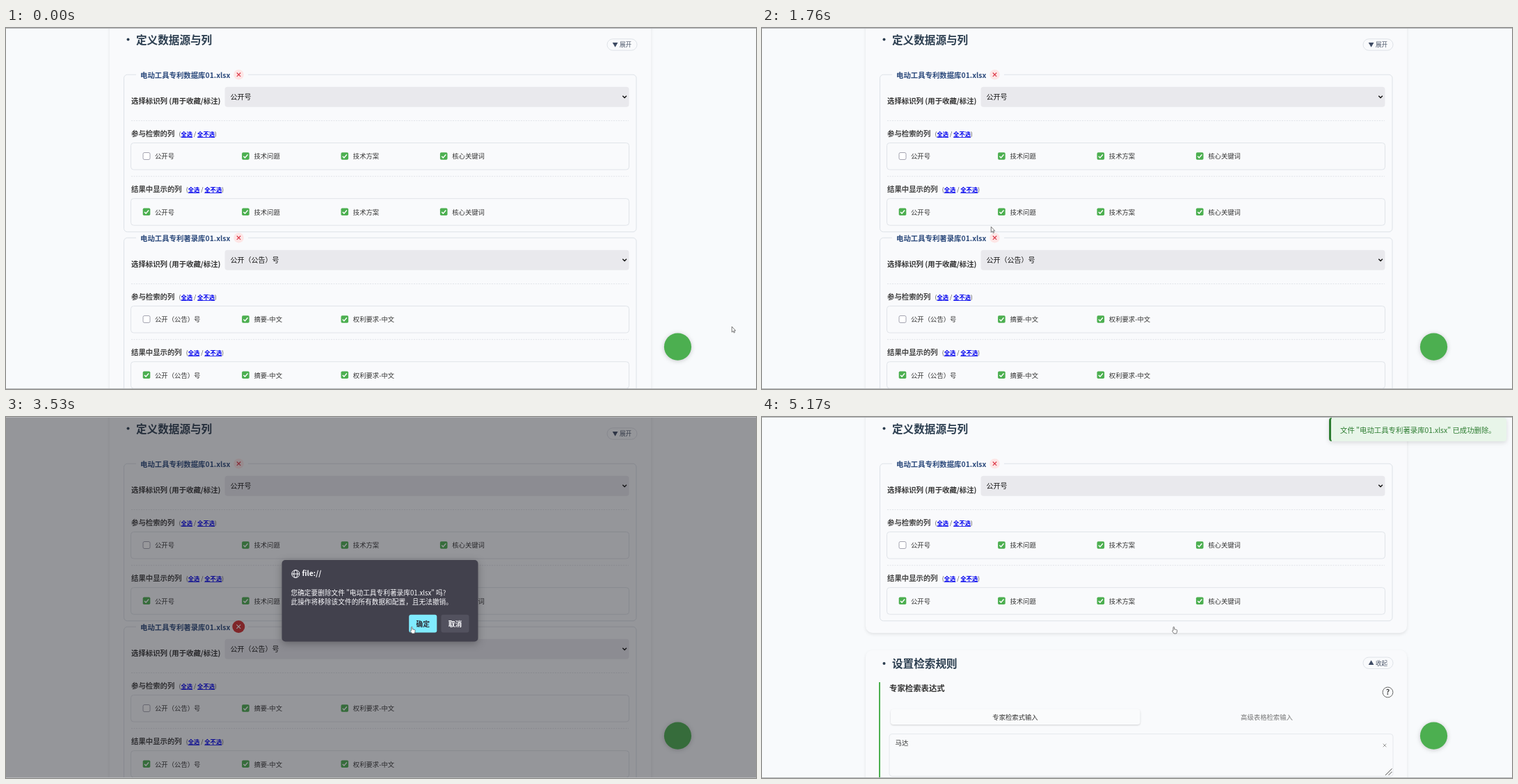
These frames come from a looping animation (1078 px wide and 520 px high, 8000 ms). An HTML page:

```html
<!DOCTYPE html>
<html lang="zh-CN">
<head>
<meta charset="utf-8">
<style>
html, body { margin: 0; width: 100%; height: 100%; overflow: hidden; background: #f8fafc; }
svg { display: block; width: 100vw; height: 100vh; }
text { font-family: "Noto Sans CJK SC", "Noto Sans CJK", sans-serif; white-space: pre; }
.card { fill: #f9fafc; filter: drop-shadow(0 2px 2px rgba(0,0,0,.09)); }
.lift { filter: drop-shadow(0 1px 1px rgba(0,0,0,.16)); }
.fab { fill: #4caf50; filter: drop-shadow(0 1.5px 3px rgba(0,0,0,.2)); }
.modal { fill: #42414d; filter: drop-shadow(0 3px 6px rgba(0,0,0,.28)); }
.toast { filter: drop-shadow(0 2px 3px rgba(0,0,0,.13)); }
</style>
</head>
<body>
<svg id="stage" viewBox="0 0 1078 520" preserveAspectRatio="none"></svg>
<script>
const LOOP = 8000;
const stage = document.getElementById('stage');

// Text is placed by its left edge (or anchor) and its vertical centre.
const text = (x, cy, size, str, fill = '#333', weight = 400, extra = '') =>
  `<text x="${x}" y="${cy + size * 0.39}" font-size="${size}" fill="${fill}" font-weight="${weight}" ${extra}>${str}</text>`;
const mid = 'text-anchor="middle"';
const rect = (x, y, w, h, r, attrs) =>
  `<rect x="${x}" y="${y}" width="${w}" height="${h}" rx="${r}" ${attrs}/>`;
const path = (d, attrs) => `<path d="${d}" fill="none" ${attrs}/>`;
const line = (stroke, width = 1) => `fill="none" stroke="${stroke}" stroke-width="${width}"`;
const cross = (x, y, r, attrs) =>
  path(`M${x - r} ${y - r}l${2 * r} ${2 * r}m0 ${-2 * r}l${-2 * r} ${2 * r}`, attrs);

function checkbox(x, y, on) {
  if (!on) return rect(x - 5, y - 5, 10, 10, 2, 'fill="#fff" stroke="#8f8f9d" stroke-width=".8"');
  return rect(x - 5.3, y - 5.3, 10.6, 10.6, 1.8, 'fill="#4caf50"') +
    path(`M${x - 3} ${y + .2}l2.1 2.2l4-4.6`, 'stroke="#fff" stroke-width="1.4"');
}

function columns(y, title, linkX, names, firstOn) {
  const link = 'text-decoration="underline"';
  const blue = '#0000ee';
  let s = path(`M180 ${y - 18.5}H895`, 'stroke="#dfe2e7" stroke-width=".9" stroke-dasharray="2 1.5"');
  s += text(180, y, 10.4, title, '#444', 700);
  s += text(linkX, y + .8, 8.3, '(', '#444');
  s += text(linkX + 3, y + .8, 8.3, '全选', blue, 700, link);
  s += text(linkX + 21.6, y + .8, 8.3, '/', '#444');
  s += text(linkX + 26.6, y + .8, 8.3, '全不选', blue, 700, link);
  s += text(linkX + 51.6, y + .8, 8.3, ')', '#444');
  s += rect(179.5, y + 13.5, 716, 38.5, 4, line('#e0e4e9'));
  names.forEach((name, i) => {
    const x = 202 + i * 142.4;
    s += checkbox(x, y + 32.5, i > 0 || firstOn) + text(x + 12, y + 32.7, 9.35, name);
  });
  return s;
}

function source(y, file, names) {
  return path(`M187 ${y}H174.5a5 5 0 0 0-5 5V${y + 221.5}a5 5 0 0 0 5 5H901a5 5 0 0 0 5-5V${y + 5}a5 5 0 0 0-5-5H348`,
      'stroke="#dde2e8"') +
    text(193, y + .5, 10.4, file, '#2c4a7c', 700) +
    text(180, y + 37.3, 10.4, '选择标识列 (用于收藏/标注)', '#333', 700) +
    rect(314.5, y + 17.5, 581, 29, 4, 'fill="#e9e9ed"') +
    text(322.5, y + 32.3, 10, names[0], '#111') +
    path(`M886.3 ${y + 30.6}l2.8 2.8l2.8-2.8`, 'stroke="#111" stroke-width="1.4"') +
    columns(y + 84.8, '参与检索的列', 248.5, names, false) +
    columns(y + 165, '结果中显示的列', 258.7, names, true);
}

const removeButton = y =>
  `<circle cx="334.5" cy="${y}" r="7.3" fill="#fde6e6"/>` +
  cross(334.5, y, 2.7, 'stroke="#dc3545" stroke-width="1.1"');

const heading = (y, title, pillY, icon, label) =>
  `<circle cx="175.5" cy="${y}" r="2" fill="#2c3e50"/>` +
  text(187, y, 15.6, title, '#2c3e50', 700) +
  rect(864, pillY - 8.2, 43, 16.4, 8.2, line('#dfe3e8')) +
  text(875.7, pillY, 8.2, icon, '#3d4a63', 400, mid) +
  text(882, pillY, 8.6, label, '#4a5568');

const rules =
  rect(149, 336, 778, 300, 10, 'class="card"') +
  heading(355, '设置检索规则', 354.3, '▲', '收起') +
  rect(168, 382, 2, 140, 0, 'fill="#4caf50"') +
  text(183, 391, 11.4, '专家检索表达式', '#333', 700) +
  `<circle cx="899.5" cy="396.5" r="7.4" ${line('#666')}/>` +
  text(899.5, 396.4, 10.5, '?', '#444', 700, mid) +
  rect(185, 421, 358.5, 22, 4, 'class="lift" fill="#fafbfc"') +
  text(364, 432, 9.35, '专家检索式输入', '#333', 400, mid) +
  text(725.5, 432, 9.35, '高级表格检索输入', '#777', 400, mid) +
  rect(183, 456.5, 724, 61, 4, line('#e6e9ed')) +
  text(191.5, 469.5, 9.4, '马达') +
  cross(895, 473, 2.3, 'stroke="#999" stroke-width="1"') +
  path('M896 516l9.5-9.5M900.5 516l5-5', 'stroke="#555" stroke-width="1"');

const dialog =
  rect(0, 0, 1078, 520, 0, 'fill="#1c1b22" fill-opacity=".45"') +
  rect(396.5, 206, 282, 117.5, 5, 'class="modal"') +
  `<g ${line('#fbfbfe')}><circle cx="416.3" cy="226" r="5.5"/>
    <ellipse cx="416.3" cy="226" rx="2.5" ry="5.5"/><path d="M411 226h10.6"/></g>` +
  text(425.5, 225.4, 10.4, 'file://', '#fbfbfe', 700) +
  text(409.5, 253.7, 9.7, '您确定要删除文件 "电动工具专利著录库01.xlsx" 吗?', '#fbfbfe') +
  text(409.5, 265.9, 9.7, '此操作将移除该文件的所有数据和配置，且无法撤销。', '#fbfbfe') +
  rect(579.2, 284.8, 40.1, 25.6, 3, 'id="ok"') +
  rect(625.4, 284.8, 40.1, 25.6, 3, 'fill="#52515e"') +
  text(599.3, 297.9, 9.75, '确定', '#2b2a33', 700, mid) +
  text(645.5, 297.9, 9.75, '取消', '#fbfbfe', 700, mid);

stage.innerHTML =
  rect(0, 0, 1078, 520, 0, 'fill="#f8fafc"') +
  rect(149, -40, 778, 351, 10, 'id="card" class="card"') +
  heading(16.5, '定义数据源与列', 24, '▼', '展开') +
  source(67.2, '电动工具专利数据库01.xlsx', ['公开号', '技术问题', '技术方案', '核心关键词']) + removeButton(67.2) +
  `<g id="second">${source(302.2, '电动工具专利著录库01.xlsx', ['公开（公告）号', '摘要-中文', '权利要求-中文'])}${removeButton(302.2)}
    <g id="hot"><circle cx="334.3" cy="302" r="9" fill="#d32f2f"/>${cross(334.3, 302, 2.9, 'stroke="#fff" stroke-width="1.1"')}</g></g>` +
  `<g id="rules">${rules}</g>` +
  '<circle class="fab" cx="965.5" cy="459.2" r="19.6"/>' +
  `<g id="dialog">${dialog}</g>` +
  `<g id="toast"><g class="toast">${rect(815, 1, 255, 34, 4, 'fill="#e8f5e9"')}
    <path d="M819 1a4 4 0 0 0-4 4v26a4 4 0 0 0 4 4l-1-3V4z" fill="#2e7d32"/></g>
    ${text(831, 18.5, 10.4, '文件 "电动工具专利著录库01.xlsx" 已成功删除。', '#2e7d32')}</g>` +
  rect(0, 0, 1078, 1, 0, 'fill="#b4b6b8"') + rect(0, 519, 1078, 1, 0, 'fill="#b4b6b8"') +
  `<g fill="#fff" stroke="#444" stroke-width=".7" stroke-linejoin="round">
    <path id="arrow" d="M.3.3v8l1.8-1.6l1.2 2.6l1.2-.6l-1.1-2.5h2.3z"/>
    <path id="hand" d="M1.5 5.8V1.2q0-.9.8-.9t.8.9v2.5l3.2.7q1 .2.9 1.3l-.4 2.4l-.7 1.8H2.6L.3 6.7q-.3-1 .5-1.1z"/></g>`;

const $ = id => document.getElementById(id);
const show = (id, on) => $(id).setAttribute('visibility', on ? 'visible' : 'hidden');
const move = (id, x, y) => $(id).setAttribute('transform', `translate(${x} ${y})`);

// Pointer stops: time, x, y, is hand
const stops = [
  [0, 1043, 429.8], [650, 1034, 422], [770, 797, 291], [890, 580, 150], [1010, 394, 62],
  [1130, 255.5, 57], [1250, 251, 178], [1370, 319.5, 253.5],
  [1520, 322, 262], [1640, 326, 275], [1760, 329, 286], [1880, 332, 294, 1], [2000, 334, 299, 1], [2120, 335.5, 301, 1],
  [2640, 337, 300], [3140, 410, 301], [3260, 500, 302], [3380, 570, 302],
  [3530, 581, 302, 1], [3650, 588, 302, 1], [3770, 589.5, 302, 1]
];

function draw(t) {
  const [, x, y, hand] = stops.findLast(s => s[0] <= t);
  show('hand', hand);
  show('arrow', !hand);
  move(hand ? 'hand' : 'arrow', x, y);

  const done = t >= 4690;
  $('card').setAttribute('height', done ? 351 : 700);
  $('second').style.display = done ? 'none' : '';
  $('rules').style.display = done ? '' : 'none';
  $('hot').setAttribute('opacity', t < 1880 ? 0 : t < 2000 ? .5 : 1);
  $('dialog').style.display = t >= 2640 && !done ? '' : 'none';
  $('ok').setAttribute('fill', t < 3530 ? '#00cadb' : t < 4550 ? '#80ebff' : '#a6eef8');

  // The toast slides in on a 120 ms beat, easing out.
  const step = Math.min(4, Math.floor((t - 4690) / 120));
  const left = done ? 0.705 * (1 - step / 4) ** 3 : 1;
  move('toast', 255 * left, 0);
  $('toast').setAttribute('opacity', done ? Math.min(1, 1.1 - left) : 0);
}

function frame() {
  draw(performance.now() % LOOP);
  requestAnimationFrame(frame);
}
frame();
</script>
</body>
</html>
```
